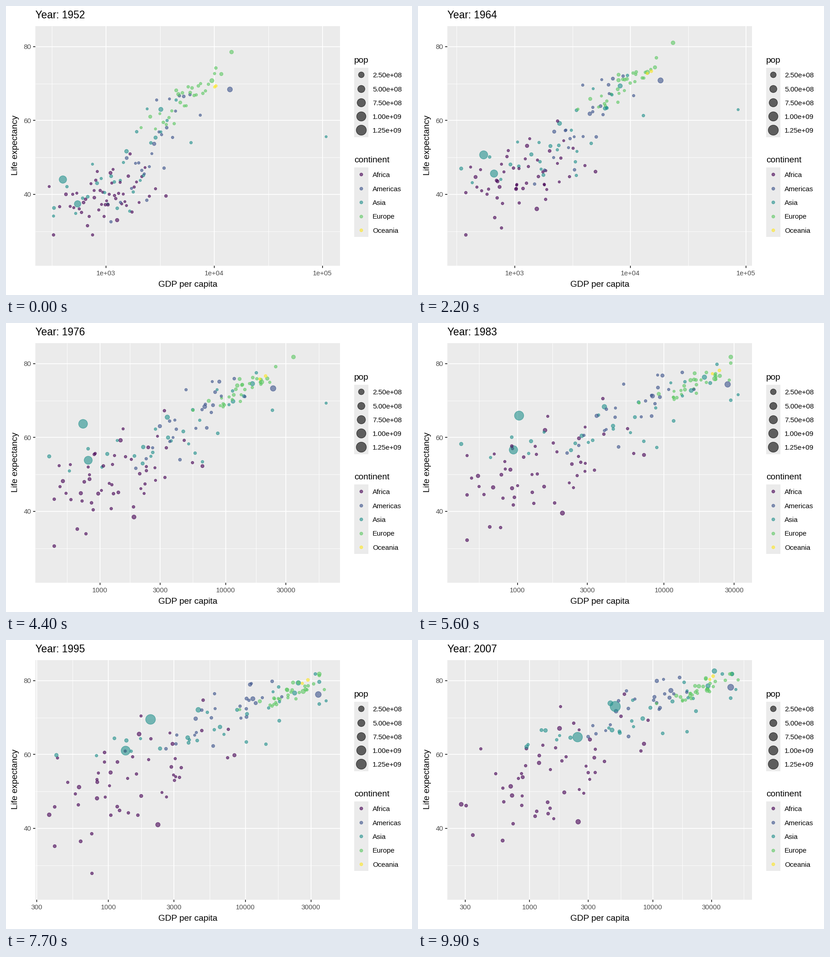
A matplotlib script that plays this animation: 885x632 px, repeating every 10000 ms.

```python
import numpy as np
import matplotlib.pyplot as plt
from matplotlib.animation import FuncAnimation
from matplotlib.collections import LineCollection
from matplotlib.colors import to_rgba
from matplotlib.patches import Rectangle

plt.rcParams["font.family"] = "Liberation Sans"

W, H, DPI = 885, 632, 64
PT = 72 / DPI                      # points per pixel
LEFT, RIGHT, TOP, BOTTOM = 64, 728, 44, 568
FRAMES = 100
YEARS = np.linspace(1952, 2007, FRAMES)
T = np.linspace(0, 1, FRAMES)
EASE = 1 - (1 - T) ** 1.6          # fast growth first, then slower
LIFE_MIN, LIFE_MAX = 23.599, 82.603
MAX_POP = 1319                     # millions
GREY = "#EBEBEB"
COLORS = {"Africa": "#440154", "Americas": "#3B528B", "Asia": "#21908C",
          "Europe": "#5DC863", "Oceania": "#FDE725"}

rng = np.random.default_rng(7)
gdps, lives, pops, tints = [], [], [], []


def dot(continent, pop, *points):
    """One country that moves through a few (year, gdp, life) points."""
    year, gdp, life = zip(*points)
    gdps.append(np.interp(YEARS, year, np.log10(gdp)))
    lives.append(np.interp(YEARS, year, life))
    pops.append(pop[0] + (pop[1] - pop[0]) * T)
    tints.append(COLORS[continent])


def spread(n):
    """Evenly filled normal scores in random order."""
    return rng.permutation(np.sort(rng.normal(size=(n, 300)), axis=0).mean(axis=1))


def wander(n):
    """Scores that drift slowly from one arrangement towards another."""
    turn = 0.6 * T[:, None]
    return np.cos(turn) * spread(n) + np.sin(turn) * spread(n)


def cloud(continent, n, gdp, gdp_sd, life, life_sd, corr, pop, growth):
    """Countries scattered around the (start, end) trend of a continent."""
    def trend(ends):
        return (ends[0] + (ends[1] - ends[0]) * EASE)[:, None]

    zx = wander(n)
    zy = corr * zx + np.sqrt(1 - corr ** 2) * wander(n)
    x = np.clip(trend(gdp) + trend(gdp_sd) * zx, floor, ceiling)
    y = np.clip(trend(life) + trend(life_sd) * zy, 29, 81.8)
    size = pop * 10 ** (0.5 * spread(n))
    gdps.extend(x.T)
    lives.extend(y.T)
    pops.extend(size[:, None] * (1 + (growth - 1) * T))
    tints.extend([COLORS[continent]] * n)


# Largest countries, and those that set the edges of the plot
dot("Asia", (556, MAX_POP), (1952, 400, 44), (1957, 576, 50.5), (1962, 488, 44.5),
    (1967, 613, 58.4), (1977, 741, 64), (1992, 1656, 68.7), (2007, 4959, 73))
dot("Asia", (372, 1110), (1952, 547, 37.4), (1977, 813, 54.2),
    (1992, 1164, 60.2), (2007, 2452, 64.7))
dot("Asia", (86, 127), (1952, 3217, 63), (1972, 14779, 73.4), (2007, 31656, 82.6))
dot("Americas", (158, 301), (1952, 13990, 68.4), (1977, 24073, 73.4),
    (2007, 42952, 78.2))
dot("Asia", (0.2, 2.5), (1952, 108382, 55.6), (1967, 80895, 64.6),
    (1972, 109348, 67.7), (1982, 31354, 71.3), (2007, 47307, 77.6))
dot("Europe", (3.3, 4.6), (1952, 10095, 72.7), (1987, 31541, 75.9),
    (2007, 49357, 80.2))
dot("Asia", (20, 48), (1952, 331, 36.3), (1967, 349, 49.4), (1982, 424, 58.1),
    (1992, 347, 59.3), (2007, 944, 62.1))
dot("Africa", (14, 65), (1952, 781, 39.1), (1987, 673, 47.4), (1997, 312, 42.6),
    (2002, 241, 45), (2007, 278, 46.5))
dot("Africa", (0.7, 2), (1952, 299, 42.1), (1987, 774, 57.2), (2007, 1569, 42.6))
dot("Africa", (2.5, 8.9), (1952, 493, 40), (1987, 848, 44), (1992, 737, 23.6),
    (2007, 863, 46.2))

floor = np.min(gdps, axis=0)[:, None] + 0.04
ceiling = np.max(gdps, axis=0)[:, None] - 0.05

# All others: log10 gdp and life expectancy with their deviations
cloud("Africa", 49, (3.02, 3.2), (0.24, 0.33), (39.3, 55.5), (5, 9),
      corr=0.5, pop=2.6, growth=3.5)
cloud("Americas", 24, (3.46, 3.91), (0.21, 0.23), (53, 73.4), (8.5, 4),
      corr=0.65, pop=3.5, growth=2.9)
cloud("Asia", 28, (3.15, 3.9), (0.32, 0.45), (46.5, 71), (8.5, 6.5),
      corr=0.7, pop=5, growth=3.2)
cloud("Europe", 29, (3.74, 4.38), (0.21, 0.17), (66, 77.6), (4.5, 2.6),
      corr=0.85, pop=8, growth=1.35)
cloud("Oceania", 2, (4.01, 4.47), (0.01, 0.09), (69.2, 80.7), (0.2, 0.8),
      corr=0.8, pop=4, growth=2.2)

order = rng.permutation(len(tints))
GDP, LIFE, POP = np.array([gdps, lives, pops])[:, order].transpose(0, 2, 1)
FACES = [to_rgba(tints[i], 0.6) for i in order]


def area(size):
    """Marker area in square points for a plot size in millimetres."""
    return ((3.556 * size + 1.18) * PT) ** 2


def pop_area(millions):
    return area(1 + 5 * np.sqrt(millions / MAX_POP))


def life_px(life):
    inner = (BOTTOM - TOP) / 1.1
    return BOTTOM - inner * (0.05 + (life - LIFE_MIN) / (LIFE_MAX - LIFE_MIN))


fig = plt.figure(figsize=(W / DPI, H / DPI), dpi=DPI, facecolor="white")
ax = fig.add_axes([0, 0, 1, 1])
ax.set(xlim=(0, W), ylim=(H, 0))
ax.axis("off")


def text(x, y, s, size, color="black", **kw):
    return ax.text(x, y, s, fontsize=size * PT, color=color, va="baseline", **kw)


def box(x, y, w, h):
    ax.add_patch(Rectangle((x, y), w, h, fc=GREY, ec="none", zorder=0))


def lines(color, width, z, segments=()):
    group = LineCollection(segments, colors=color, linewidths=width * PT, zorder=z)
    ax.add_collection(group, autolim=False)
    return group


def dots(x, y, sizes, faces):
    return ax.scatter(x, y, s=sizes, c=faces, edgecolors="face",
                      linewidths=1.18 * PT, zorder=5)


def rows(values, x0, x1):
    return [[(x0, life_px(v)), (x1, life_px(v))] for v in values]


MAJOR_LIFE = (40, 60, 80)
box(LEFT, TOP, RIGHT - LEFT, BOTTOM - TOP)
lines("white", 0.9, 1, rows((30, 50, 70), LEFT, RIGHT))
lines("white", 1.78, 2, rows(MAJOR_LIFE, LEFT, RIGHT))
lines("#333333", 1.78, 2, rows(MAJOR_LIFE, LEFT - 4.6, LEFT))
for v in MAJOR_LIFE:
    text(55, life_px(v) + 5.5, str(v), 14.8, "#4D4D4D", ha="right")

text((LEFT + RIGHT) / 2, 614, "GDP per capita", 19, ha="center")
text(25.2, 304.5, "Life expectancy", 19, ha="center",
     rotation=90, rotation_mode="anchor")

# Legends
text(759, 124, "pop", 19)
box(759, 135.3, 30.5, 151.4)
for i in range(5):
    y, pop = 150.3 + 30.25 * i, 250 * (i + 1)
    dots([774.4], [y], pop_area(pop), [(0, 0, 0, 0.6)])
    text(799, y + 6, f"{pop * 1e6:.2e}", 15.1)
text(759, 342.5, "continent", 19)
box(759, 353, 30.5, 151.6)
for i, (name, color) in enumerate(COLORS.items()):
    y = 368.3 + 30.4 * i
    dots([774.4], [y], area(1.5), [to_rgba(color, 0.6)])
    text(799, y + 6, name, 15.1)

title = text(LEFT, 27, "", 22.5)
minor_grid = lines("white", 0.9, 1)
major_grid = lines("white", 1.78, 2)
ticks = lines("#333333", 1.78, 2)
labels = [text(0, 589, "", 14.8, "#4D4D4D", ha="center") for _ in range(6)]
countries = dots(GDP[0], LIFE[0], pop_area(POP[0]), FACES)


def breaks(right):
    """Whole decades while 1e5 is in view, else steps of one and three."""
    decades = np.arange(2, 7)
    if right >= 5:
        return decades, [f"1e+{k:02d}" for k in decades]
    major = np.sort(np.concatenate([decades, decades + np.log10(3)]))
    return major, [f"{10 ** v:.0f}" for v in major]


def draw(frame):
    gdp = GDP[frame]
    pad = 0.05 * np.ptp(gdp)
    left, right = gdp.min() - pad, gdp.max() + pad

    def px(v):
        return LEFT + (RIGHT - LEFT) * (v - left) / (right - left)

    def columns(values, top, bottom):
        return [[(px(v), top), (px(v), bottom)] for v in values if left < v < right]

    major, names = breaks(right)
    minor_grid.set_segments(columns((major[1:] + major[:-1]) / 2, TOP, BOTTOM))
    major_grid.set_segments(columns(major, TOP, BOTTOM))
    ticks.set_segments(columns(major, BOTTOM, BOTTOM + 4.6))
    shown = [(px(v), s) for v, s in zip(major, names) if left < v < right]
    for i, label in enumerate(labels):
        x, s = shown[i] if i < len(shown) else (0, "")
        label.set_x(x)
        label.set_text(s)

    countries.set_offsets(np.column_stack([px(gdp), life_px(LIFE[frame])]))
    countries.set_sizes(pop_area(POP[frame]))
    title.set_text(f"Year: {round(YEARS[frame])}")
    return countries, title


anim = FuncAnimation(fig, draw, frames=FRAMES, interval=100, repeat=True,
                     repeat_delay=0, blit=False)
plt.show()
```
